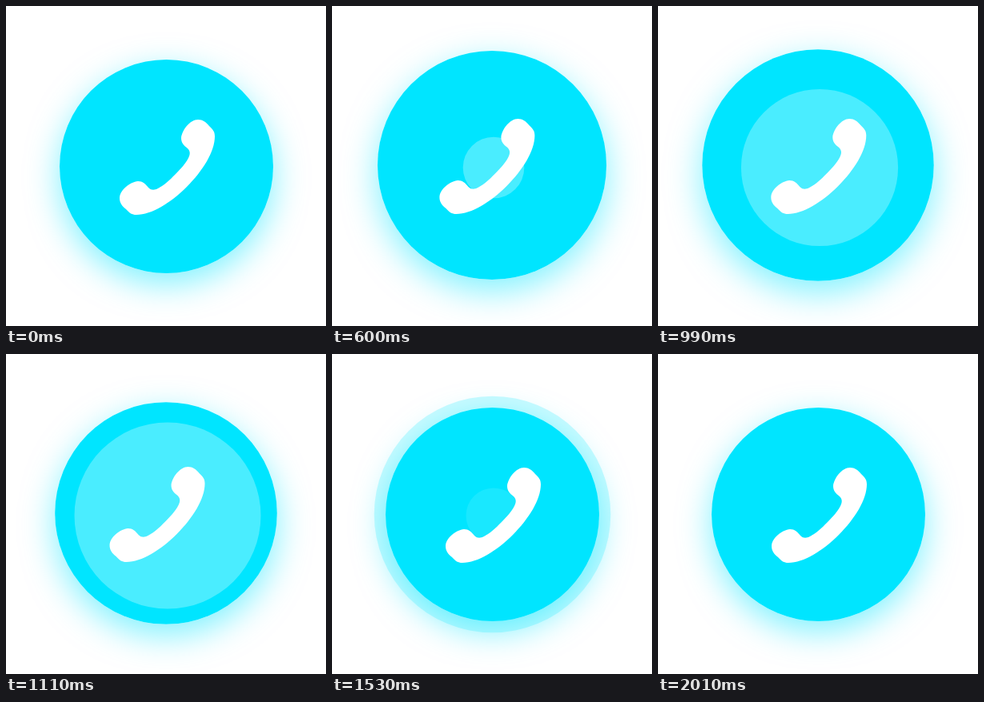
Recreate the animation shown at these times as an HTML page. Size 400 by 400 pixels, loop 2400 ms.

```html
<!DOCTYPE html>
<html lang="en">
<head>
<meta charset="utf-8">
<title>Incoming call</title>
<style>
  html, body { margin: 0; width: 100%; height: 100%; overflow: hidden; background: #fff; }
  #stage { position: relative; width: 400px; height: 400px; overflow: hidden; }
  #stage > * { position: absolute; }
  #button, #ring {
    left: 67px; top: 67px; width: 267px; height: 267px;
    border-radius: 50%; background: #00e5ff;
  }
  #glow {
    left: 67px; top: 67px; width: 267px; height: 267px; border-radius: 50%;
    box-shadow: 0 13.35px 40px rgba(0, 229, 255, .5);
  }
  #ripple {
    left: 101.5px; top: 101.5px; width: 200px; height: 200px;
    border-radius: 50%; background: #fff;
  }
  #phone { left: 0; top: 0; width: 400px; height: 400px; overflow: visible; }
</style>
</head>
<body>
<div id="stage">
  <div id="glow"></div>
  <div id="ring"></div>
  <div id="button"></div>
  <div id="ripple"></div>
  <svg id="phone" viewBox="0 0 400 400">
    <path fill="#fff" d="M240 142C246 142 250 145 254 150C259 155 261 157 261 163
      C261 182 246 206 226 226C206 246 182 261 163 261C157 261 155 259 150 254
      C145 250 142 246 142 240C142 230 155 220 165 219C171 219 174 222 178 227
      C182 231 186 230 190 228C198 224 205 217 211 211C217 205 224 198 228 190
      C230 186 231 182 227 178C222 174 219 171 219 165C220 155 230 142 240 142Z"/>
  </svg>
</div>
<script>
const LOOP = 2400, TICK = 30;
const [glow, ring, button, ripple, phone] =
  ['glow', 'ring', 'button', 'ripple', 'phone'].map(id => document.getElementById(id));

// Each track is a list of [time in ms, value], joined by straight lines.
const tracks = {
  scale: [[200, 1], [424, 1.04], [648, 1.08], [872, 1.13], [1096, 1.043], [1285, 1]],
  shake: [[200, 0], [424, 13.33], [648, -13.33], [872, 13.33], [1096, -13.33], [1310, 0]],
  rippleRadius: [[350, 0], [1110, 116.5], [1707, 0]],
  rippleAlpha: [[1290, .29], [1656, 0]],
  ringScale: [[1350, 1], [1770, 1.25]],
  ringAlpha: [[1320, .36], [1770, .03]]
};

function valueAt(track, t) {
  if (t <= track[0][0]) return track[0][1];
  for (let i = 1; i < track.length; i++) {
    const [t0, v0] = track[i - 1], [t1, v1] = track[i];
    if (t <= t1) return v0 + (v1 - v0) * (t - t0) / (t1 - t0);
  }
  return track[track.length - 1][1];
}

function draw(t) {
  const at = name => valueAt(tracks[name], t);
  const ringing = t >= 240 && t < 1285;
  const nudge = ringing ? 'translate(-.5px, -1.5px) ' : '';

  button.style.transform = glow.style.transform = `${nudge}scale(${at('scale')})`;
  phone.style.transform = `translate(${at('shake')}px, ${ringing ? -1 : 0}px)`;
  ripple.style.transform = `scale(${at('rippleRadius') / 100})`;
  ripple.style.opacity = at('rippleAlpha');
  ring.style.transform = `scale(${at('ringScale')})`;
  ring.style.opacity = t >= 1320 && t < 2010 ? at('ringAlpha') : 0;
}

const start = performance.now();
function frame() {
  const t = (performance.now() - start) % LOOP;
  draw(Math.floor(t / TICK) * TICK);
  requestAnimationFrame(frame);
}
frame();
</script>
</body>
</html>
```
